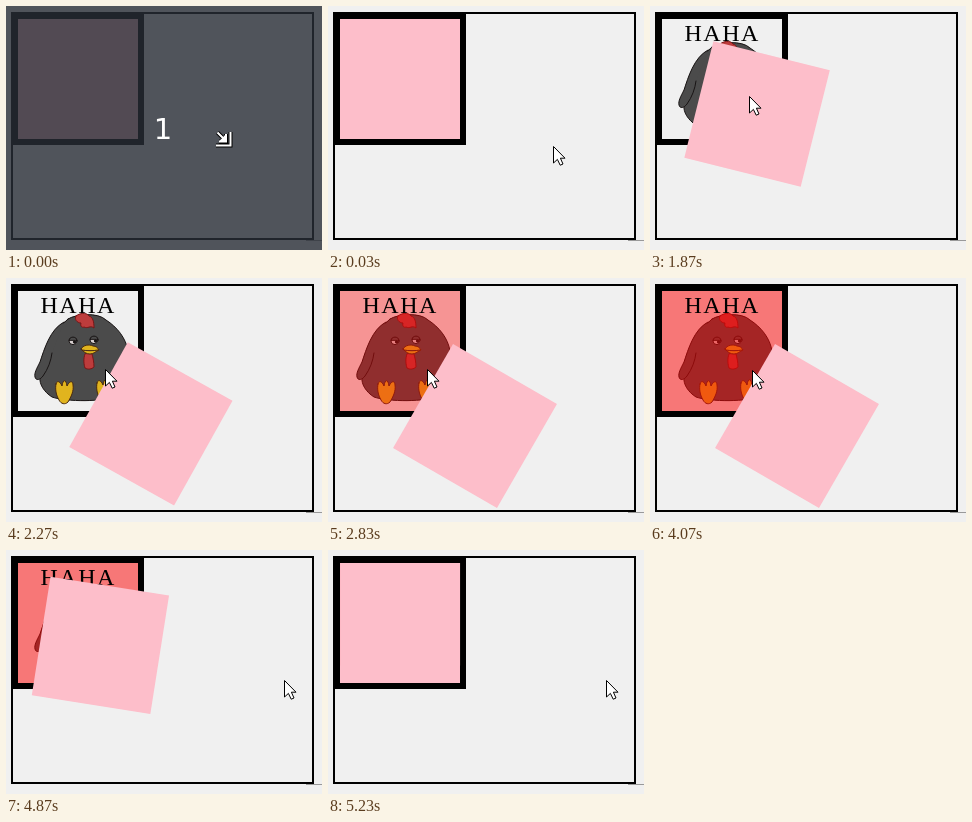
Write an HTML page that moves like this. It is 316 px wide and 244 px high and loops after 6.26 s.

```html
<!DOCTYPE html>
<html lang="en">
<head>
<meta charset="utf-8">
<title>Hover card</title>
<style>
  html, body { margin: 0; width: 100%; height: 100%; overflow: hidden; background: #f0f0f0; }
  svg { display: block; width: 100vw; height: 100vh; }
</style>
</head>
<body>
<svg viewBox="0 0 316 244">
  <rect width="316" height="244" fill="#f0f0f0"/>
  <path d="M300 234.5H316" stroke="#999"/>
  <rect x="6" y="7" width="301" height="226" fill="none" stroke="#000" stroke-width="2"/>
  <rect x="6" y="7" width="132" height="132"/>
  <rect x="12" y="13" width="120" height="120" fill="#f0f0f0"/>

  <g id="hen" stroke="#181414" stroke-width="1" stroke-linejoin="round" stroke-linecap="round">
    <path fill="#4b4b4b" d="M62 41C70 36 92 34 100 42C111 49 120 60 122 73C124 88 124 108 112 118C98 124 60 124 46 119C38 114 33 106 34 99C37 84 46 53 62 41Z"/>
    <path fill="#4b4b4b" d="M58 44C44 51 38 72 34 84C31 90 28 95 29 99C30 103 34 102 37 98C42 91 45 83 46 75"/>
    <path fill="#bd3c3c" stroke="#7a1515" d="M70 38C74 35 80 34 83 38C87 39 88 44 88 50C84 47 82 51 78 49C76 50 74 48 75 45C71 45 68 41 70 38Z"/>
    <g id="foot">
      <path fill="#e1b41e" stroke="#4a2a10" d="M50 106C51 102 54 103 56 108C57 101 60 101 61 108C64 102 67 103 67 107C68 113 65 119 62 124C59 127 55 126 53 122C50 117 49 111 50 106Z"/>
    </g>
    <use href="#foot" x="41" y="-1"/>
    <path fill="#bd3c3c" stroke="#7a1515" d="M79 76C77 81 78 87 79 90C82 92 86 91 88 89C88 84 87 80 86 76Z"/>
    <path fill="#e1b41e" stroke="#4a2a10" d="M75 71C77 67 83 66 87 68C90 68 92 70 93 72C90 73 88 76 84 76C80 76 78 74 75 71ZM76 72C81 73 87 73 92 72"/>
    <g id="eye">
      <ellipse cx="67" cy="63" rx="4" ry="3.6" fill="#d8d0d0"/>
      <path fill="#4b4b4b" d="M63 62C64 58 70 58 71 62Z"/>
      <circle cx="68.5" cy="64" r="1.2" fill="#181414"/>
    </g>
    <use href="#eye" x="21" y="-1"/>
  </g>

  <rect id="tint" x="12" y="13" width="120" height="120" fill="#f00"/>
  <text x="34.5" y="34.5" font-family="'Liberation Serif', serif" font-size="24" letter-spacing="1.5">HAHA</text>
  <rect id="cover" x="-60" y="-60" width="120" height="120" fill="#fdbeca"/>
  <path id="pointer" d="M.5 .5V17L4.4 13.4L7.2 19.2L10 18L7.4 12.2H12Z" fill="#fff" stroke="#000"/>

  <g id="countdown">
    <rect width="316" height="244" fill="#282d36" fill-opacity=".8"/>
    <text x="157" y="133" fill="#fff" text-anchor="middle" font-family="'DejaVu Sans', sans-serif" font-size="29">1</text>
    <g fill="none">
      <path d="M224.5 126V139.5H210M211.5 126.500L217 132M220 128V135.500H213" stroke="#000" stroke-width="4"/>
      <path d="M224.5 126V139.5H210M211.5 126.500L217 132M220 128V135.500H213" stroke="#fff" stroke-width="2"/>
      <path d="M220 128V135.500H213Z" fill="#fff"/>
    </g>
  </g>
</svg>
<script>
const LOOP = 6260, ENTER = 1390, LEAVE = 4250, TINT = 2365;
const [tint, cover, pointer, countdown] =
  ["tint", "cover", "pointer", "countdown"].map(id => document.getElementById(id));

// Pointer stops: time, x, y; equal times make a jump
const stops = [
  [0, 225, 140], [1330, 225, 140], [1330, 152, 118], [1430, 152, 118],
  [1430, 125, 104], [1600, 99, 90], [1900, 99, 90], [2000, 99, 91],
  [4070, 99, 91], [4070, 102, 92], [4170, 102, 92], [4250, 212, 116],
  [4400, 278, 130], [LOOP, 278, 130]
];

function bezier(x1, y1, x2, y2) {
  const curve = (a, b, u) => 3 * (1 - u) ** 2 * u * a + 3 * (1 - u) * u * u * b + u ** 3;
  return x => {
    if (x <= 0) return 0;
    if (x >= 1) return 1;
    let low = 0, high = 1;
    for (let i = 0; i < 24; i++) {
      const mid = (low + high) / 2;
      if (curve(x1, x2, mid) < x) low = mid; else high = mid;
    }
    return curve(y1, y2, low);
  };
}
const ease = bezier(.25, .1, .25, 1);
const easeInOut = bezier(.42, 0, .58, 1);

function pointerAt(t) {
  const i = stops.findIndex(stop => stop[0] > t);
  const [t0, x0, y0] = stops[i - 1], [t1, x1, y1] = stops[i];
  const k = (t - t0) / (t1 - t0);
  return [x0 + (x1 - x0) * k, y0 + (y1 - y0) * k];
}

function draw() {
  const t = performance.now() % LOOP;
  const open = easeInOut((t - ENTER) / 1000) - easeInOut((t - LEAVE) / 1000);
  const counting = t < 30;
  cover.setAttribute("transform",
    `translate(${72 + 75 * open} ${73 + 75 * open}) rotate(${30 * open})`);
  tint.setAttribute("opacity", .5 * ease((t - TINT) / 1000));
  pointer.setAttribute("transform", `translate(${pointerAt(t)})`);
  pointer.setAttribute("visibility", counting ? "hidden" : "visible");
  countdown.setAttribute("visibility", counting ? "visible" : "hidden");
  requestAnimationFrame(draw);
}
draw();
</script>
</body>
</html>
```
